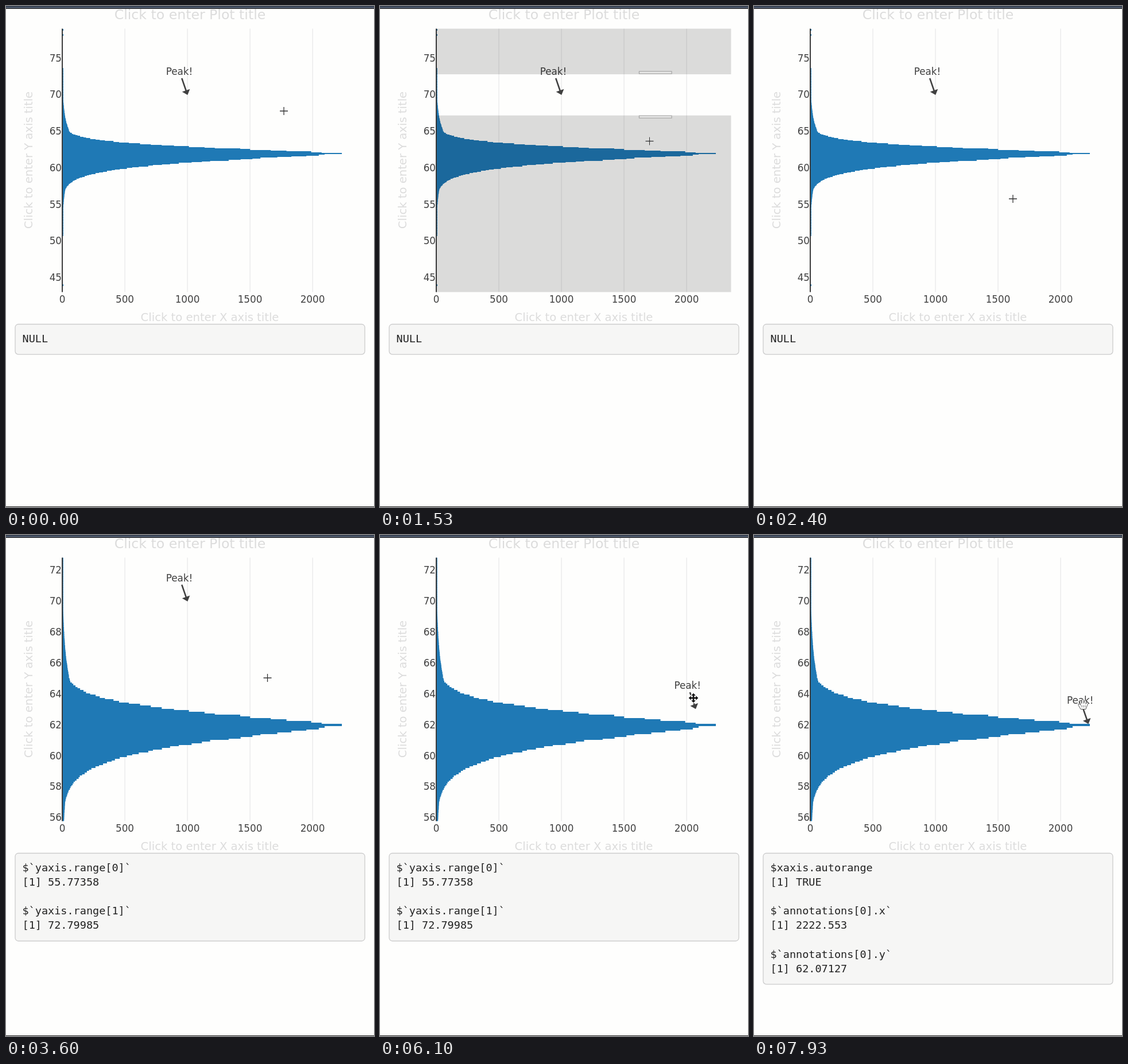
Animation, 641 px wide and 873 px high, one loop 8 s. Source, as an HTML page with a canvas:

```html
<!DOCTYPE html>
<html lang="en">
<head>
<meta charset="utf-8">
<title>Editable histogram</title>
<style>
  html, body { margin: 0; width: 100%; height: 100%; overflow: hidden; background: #fefefd; }
  canvas { display: block; }
</style>
</head>
<body>
<canvas id="stage" width="641" height="873"></canvas>
<script>
const ctx = document.getElementById('stage').getContext('2d');
const LOOP = 8000;
const SANS = '"DejaVu Sans", sans-serif';
const MONO = '"DejaVu Sans Mono", monospace';
const INK = '#404040', PALE = '#dcdcdc';
const LEFT = 98, TOP = 39.5, RIGHT = 611.5, BOTTOM = 498.5, PER_X = 0.218;
const WIDE = { lo: 43, hi: 79, first: 45, step: 5 };
const ZOOM = { lo: 55.77358, hi: 72.79985, first: 56, step: 2 };
const ZOOM_TOP = 119;             // where the zoom drag begins
const DRAG_LAG = 50;              // the zoom box trails the pointer
const GRIP = [312.3, 96.5];       // where the pointer takes hold of the note
const DROP = 6760;                // when the note is let go

// Pointer path: time, x, y
const CURSOR = [
  [940, 484, 183], [1160, 479.5, 119], [1400, 479.5, 119], [1530, 469.5, 235.5],
  [1660, 466, 261], [1790, 466, 261], [1860, 463.5, 305], [2160, 451, 336],
  [3180, 451, 336], [3360, 468, 266], [3570, 468, 266], [3600, 455.5, 249], [3730, 354, 96],
  [3910, 354, 96], [4700, 305, 89], [5330, 305, 89], [5360, 312, 91], [5800, 530, 273],
  [5980, 530, 273], [6100, 546, 284], [DROP, 578.5, 310], [7540, 578.5, 310], [7930, 573, 294.5]];

function cursorAt(t) {
  const i = CURSOR.findIndex(k => k[0] > t);
  if (i < 0) return CURSOR[CURSOR.length - 1].slice(1);
  if (i === 0) return CURSOR[0].slice(1);
  const [t0, x0, y0] = CURSOR[i - 1], [t1, x1, y1] = CURSOR[i];
  const u = (t - t0) / (t1 - t0);
  return [x0 + (x1 - x0) * u, y0 + (y1 - y0) * u];
}

function cubicInOut(u) {
  u = Math.min(1, Math.max(0, u));
  return u < 0.5 ? 4 * u ** 3 : 1 - 4 * (1 - u) ** 3;
}

function noise(n) {
  const s = Math.sin(n * 12.9898) * 43758.5453;
  return s - Math.floor(s);
}

function rect(x, y, w, h, fill) {
  ctx.fillStyle = fill;
  ctx.fillRect(x, y, w, h);
}

function text(s, x, y, size, color = INK, align = 'center', font = SANS) {
  ctx.font = `${size}px ${font}`;
  ctx.textAlign = align;
  ctx.fillStyle = color;
  ctx.fillText(s, x, y);
}

const toY = (view, v) => BOTTOM - (v - view.lo) / (view.hi - view.lo) * (BOTTOM - TOP);

// Steeper above the peak at 62.0 than below it, with a long thin tail; n counts tenths
function barLength(n) {
  if (n < 508 || n > 736) return [440, 782, 789].includes(n) ? 2 : 0;
  const d = Math.abs(n - 620) / 10;
  const fall = n > 620 ? 0.93 * d ** 1.3 : 0.62 * d ** 1.25;
  const body = Math.max(487 * Math.exp(-fall), 48 * Math.exp(-0.45 * d));
  const jitter = d ? 0.97 + 0.06 * noise(n) : 1;
  return Math.max(1.7, body * jitter);
}

function drawPlot(view) {
  for (let v = 500; v <= 2000; v += 500) {
    rect(LEFT + v * PER_X - 0.7, TOP, 1.5, BOTTOM - TOP, '#ececec');
  }
  ctx.save();
  ctx.beginPath();
  ctx.rect(LEFT, TOP, RIGHT - LEFT, BOTTOM - TOP);
  ctx.clip();
  // Bars snap to whole pixels and reach slightly past their lower edge
  for (let n = 430; n <= 790; n++) {
    const top = Math.round(toY(view, n / 10 + 0.05) + 0.2);
    const end = Math.round(toY(view, n / 10 - 0.05) + 1.2);
    rect(LEFT, top, barLength(n), end - top, '#1f79b5');
  }
  ctx.restore();
  rect(LEFT - 1, TOP, 2, BOTTOM - TOP, '#3c3c3c');
}

function drawLabels(view) {
  for (let v = view.first; v < view.hi - 0.5; v += view.step) {
    text(v, 97, toY(view, v) + 6, 16.8, INK, 'right');
  }
  for (let v = 0; v <= 2000; v += 500) text(v, LEFT + v * PER_X, 517, 16.8);
  text('Click to enter Plot title', 320.5, 22.5, 23.6, PALE);
  text('Click to enter X axis title', 355, 549, 19.6, PALE);
  ctx.save();
  ctx.translate(46, 268.5);
  ctx.rotate(-Math.PI / 2);
  text('Click to enter Y axis title', 0, 0, 19.6, PALE);
  ctx.restore();
}

function drawNote(view, t) {
  const [cx, cy] = cursorAt(Math.min(t, DROP));
  const held = t >= 5360;
  const dx = held ? Math.max(0, cx - GRIP[0]) : 0;
  const dy = held ? Math.max(0, cy - GRIP[1]) : 0;
  const x = LEFT + 1000 * PER_X + dx, y = toY(view, 70) + dy;
  text('Peak!', x - 14, y - 34, 16.8);
  ctx.save();
  ctx.translate(x, y);
  ctx.rotate(Math.atan2(40.5, 14));
  rect(-30, -1.3, 26, 2.6, INK);
  ctx.beginPath();
  ctx.moveTo(-7.6, -7.2);
  ctx.lineTo(-7.6, 7.2);
  ctx.lineTo(0.8, 0);
  ctx.fill();
  ctx.restore();
}

function drawZoomBox(t) {
  const edge = cursorAt(t - DRAG_LAG)[1], fade = cubicInOut((t - 1439) / 200);
  const w = RIGHT - LEFT, shade = `rgba(0,0,6,${0.362 * fade})`;
  rect(LEFT, TOP, w, ZOOM_TOP - TOP, shade);
  rect(LEFT, edge, w, BOTTOM - edge, shade);
  ctx.globalAlpha = fade;
  ctx.lineWidth = 1.2;
  ctx.strokeStyle = INK;
  for (const y of [ZOOM_TOP - 5, edge + 0.5]) {
    rect(451.5, y, 56.5, 4, '#fff');
    ctx.strokeRect(451.5, y, 56.5, 4);
  }
  ctx.globalAlpha = 1;
}

function drawPanel(lines) {
  ctx.beginPath();
  ctx.roundRect(16, 554.5, 609, 27.5 + 25.1 * lines.length, 5.5);
  ctx.fillStyle = '#f6f6f5';
  ctx.fill();
  ctx.lineWidth = 1.3;
  ctx.strokeStyle = '#ccc';
  ctx.stroke();
  lines.forEach((s, i) => text(s, 28.5, 586 + 25.1 * i, 18.5, '#222', 'left', MONO));
}

function panelLines(t) {
  if (t < 2460) return ['NULL'];
  if (t < 7030) return ['$`yaxis.range[0]`', '[1] 55.77358', '', '$`yaxis.range[1]`', '[1] 72.79985'];
  return ['$xaxis.autorange', '[1] TRUE', '', '$`annotations[0].x`', '[1] 2222.553', '',
    '$`annotations[0].y`', '[1] 62.07127'];
}

const CROSS = new Path2D('M-7 0H7M0-7V7');
const MOVE = new Path2D('M0-8L3.2-4.6H1V-1H4.6V-3.2L8 0L4.6 3.2V1H1V4.6H3.2L0 8L-3.2 4.6H-1V1H-4.6V3.2L-8 0L-4.6-3.2V-1H-1V-4.6H-3.2Z');
const HAND = new Path2D('M-4 9L-8 2Q-9-1-6 0L-4 2L-6-5Q-5-8-3.5-5L-2-1L-2-7Q0-10 1-7L1.5-1L3-6Q5-8 5.5-5L5 0L7-3Q9-4 9-1Q7 3 5 9Z');
const FINGERS = new Path2D('M-2 2V6M1 2V6M4 2V6');

function stroke(path, color, width) {
  ctx.strokeStyle = color;
  ctx.lineWidth = width;
  ctx.stroke(path);
}

function drawCursor(t) {
  ctx.save();
  ctx.translate(...cursorAt(t));
  ctx.lineJoin = 'round';
  if (t < 4300) {
    stroke(CROSS, 'rgba(255,255,255,.8)', 3.2);
    stroke(CROSS, '#333', 1.3);
  } else if (t < 7600) {
    stroke(MOVE, '#fff', 3);
    stroke(MOVE, '#111', 0.6);
    ctx.fillStyle = '#111';
    ctx.fill(MOVE);
  } else {
    ctx.fillStyle = '#fff';
    ctx.fill(HAND);
    stroke(HAND, '#555', 1);
    stroke(FINGERS, '#777', 1);
  }
  ctx.restore();
}

function drawFrame() {
  rect(0, 0, 641, 1, '#2a303c');
  rect(0, 1, 641, 2.5, '#46546a');
  rect(0, 3.5, 641, 1.5, '#14171d');
  rect(0, 872, 641, 1, '#222');
}

function draw(t) {
  const view = t < 2430 ? WIDE : ZOOM;
  rect(0, 0, 641, 873, '#fefefd');
  drawPlot(view);
  drawLabels(view);
  drawNote(view, t);
  if (t >= 1400 && t < 2400) drawZoomBox(t);
  drawPanel(panelLines(t));
  drawFrame();
  drawCursor(t);
}

let start;
function tick(now) {
  start ??= now;
  draw((now - start) % LOOP);
  requestAnimationFrame(tick);
}
requestAnimationFrame(tick);
</script>
</body>
</html>
```
